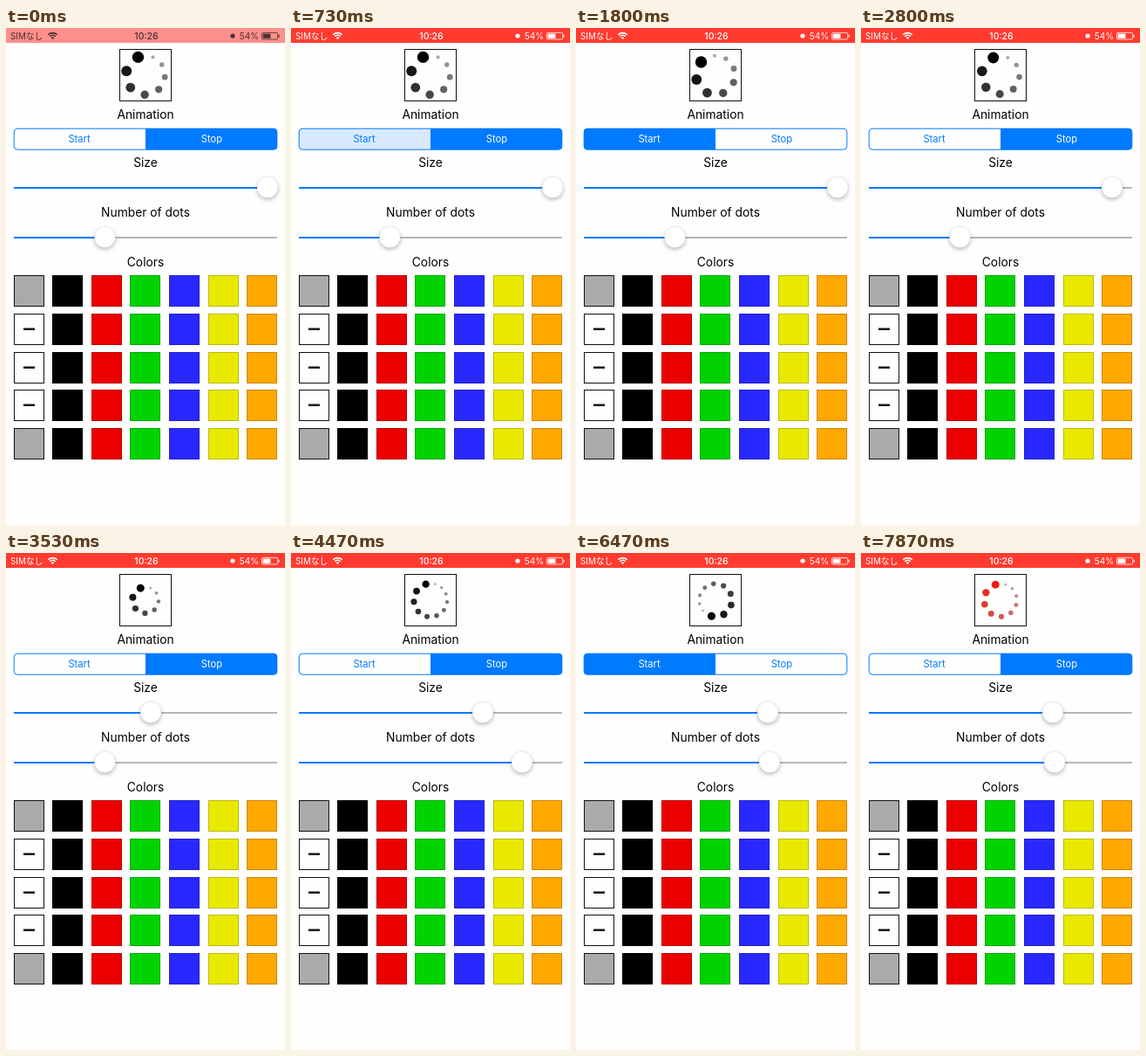
Animation, 320 px wide and 569 px high, one loop 8 s. Source, as an HTML page with a canvas:

```html
<!DOCTYPE html>
<html lang="ja">
<head>
<meta charset="utf-8">
<title>Spinner settings</title>
<style>
html, body { margin: 0; width: 100%; height: 100%; overflow: hidden; background: #fefeff; }
canvas { display: block; width: 320px; height: 569px; }
</style>
</head>
<body>
<canvas id="stage"></canvas>
<script>
const W = 320, H = 569, LOOP = 8000, FPS = 15;
const BLUE = '#007aff', PAPER = '#fefeff', GRAY = [170, 170, 170];
const FONT = 'Inter, "Noto Sans CJK JP", "Noto Sans CJK", sans-serif';
const SWATCHES = ['#aaaaaa', '#000000', '#eb0000', '#00d300', '#2929ff', '#e9e900', '#ffa800'];

// Slider thumb paths: [ms, x]
const SIZE_PATH = [[2733, 300], [2800, 288], [3330, 130], [3800, 220]];
const COUNT_PATH = [[4000, 113.4], [4070, 118], [4467, 265], [4670, 300], [4850, 290], [5133, 174], [5270, 150], [5600, 222]];
// Each run: start button down, spinning, stop button down, stopped
const RUNS = [[730, 835, 1865, 1995], [6065, 6172, 6865, 6995]];
const RED_AT = 7795;

const canvas = document.getElementById('stage');
const ctx = canvas.getContext('2d');
const ratio = window.devicePixelRatio || 1;
canvas.width = W * ratio;
canvas.height = H * ratio;

const clamp = v => Math.max(0, Math.min(1, v));
const mix = (a, b, p) => `rgb(${a.map((v, i) => Math.round(v + (b[i] - v) * p))})`;

// Hermite curve through the points, flat at the ends and turning points
function follow(path, t) {
  const last = path.length - 1;
  if (t <= path[0][0]) return path[0][1];
  if (t >= path[last][0]) return path[last][1];
  const rate = i => (path[i + 1][1] - path[i][1]) / (path[i + 1][0] - path[i][0]);
  const slope = i => {
    if (i === 0 || i === last) return 0;
    const a = rate(i - 1), b = rate(i);
    return a * b <= 0 ? 0 : 2 * a * b / (a + b);
  };
  const i = path.findIndex(p => p[0] > t) - 1;
  const [t0, x0] = path[i], [t1, x1] = path[i + 1];
  const d = t1 - t0, u = (t - t0) / d, s = u * u * (3 - 2 * u);
  return x0 + (x1 - x0) * s + d * u * (1 - u) * (slope(i) * (1 - u) - slope(i + 1) * u);
}

function text(str, x, y, size, color, align = 'center', weight = 400) {
  ctx.font = `${weight} ${size}px ${FONT}`;
  ctx.textAlign = align;
  ctx.fillStyle = color;
  ctx.fillText(str, x, y);
}

function disc(x, y, r, color) {
  ctx.fillStyle = color;
  ctx.beginPath();
  ctx.arc(x, y, r, 0, Math.PI * 2);
  ctx.fill();
}

function rect(x, y, w, h, color) {
  ctx.fillStyle = color;
  ctx.fillRect(x, y, w, h);
}

function frame(x, y, w, h, color) {
  ctx.strokeStyle = color;
  ctx.lineWidth = 1;
  ctx.strokeRect(x + 0.5, y + 0.5, w - 1, h - 1);
}

function statusBar(t) {
  const p = clamp(t / 333);
  const ink = mix([72, 48, 48], [255, 255, 255], p);
  rect(0, 0, W, 17, mix([255, 143, 139], [255, 59, 48], p));
  text('SIMなし', 5, 12.6, 9.8, ink, 'left');
  text('10:26', 161, 12.7, 10.5, ink, 'center', 500);
  text('54%', 290, 12.7, 10, ink, 'right');
  disc(260, 9, 2.6, ink);

  // Wi-Fi fan
  ctx.strokeStyle = ink;
  ctx.lineWidth = 1.6;
  for (const r of [4.6, 7.4]) {
    ctx.beginPath();
    ctx.arc(53.5, 13, r, -Math.PI * 0.75, -Math.PI * 0.25);
    ctx.stroke();
  }
  ctx.fillStyle = ink;
  ctx.beginPath();
  ctx.moveTo(53.5, 13);
  ctx.arc(53.5, 13, 2.6, -Math.PI * 0.75, -Math.PI * 0.25);
  ctx.fill();

  // Battery
  ctx.lineWidth = 0.8;
  ctx.beginPath();
  ctx.roundRect(293.4, 5.4, 18.2, 7.6, 1.4);
  ctx.stroke();
  rect(294.6, 6.6, 8.8, 5.2, ink);
  rect(312.4, 7.8, 1.2, 2.8, ink);
}

function spinner(size, count, turn, ink) {
  const R = size / 2 - 1, least = 0.31;
  const big = Math.PI * R / (count * (1 + least) + Math.PI);
  const ring = R - big;
  const radius = i => big * (least + (1 - least) * i / (count - 1));
  // The dots cover half the ring; the gaps between them are equal
  const gap = Math.PI * ring / count;
  let angle = -Math.PI / 2 + Math.PI / count + turn;
  for (let i = 0; i < count; i++) {
    disc(160 + ring * Math.cos(angle), 54 + ring * Math.sin(angle), radius(i),
      mix(GRAY, ink, i / (count - 1)));
    angle += (radius(i) + radius(i + 1) + gap) / ring;
  }
}

function segments(on, pressed) {
  const edge = 160;
  ctx.save();
  ctx.beginPath();
  ctx.roundRect(9, 115, 302, 24.5, 4);
  ctx.clip();
  rect(on ? 9 : edge, 115, 151, 24.5, BLUE);
  if (pressed) rect(on ? edge : 9, 115, 151, 24.5, 'rgba(0,122,255,0.15)');
  ctx.restore();
  ctx.strokeStyle = BLUE;
  ctx.lineWidth = 1;
  ctx.beginPath();
  ctx.roundRect(9.2, 115.2, 301.6, 24, 4);
  ctx.stroke();
  text('Start', 84, 131.2, 11.2, on ? PAPER : BLUE);
  text('Stop', 236, 131.2, 11.2, on ? BLUE : PAPER);
}

function slider(x, y) {
  rect(9, y - 1, 302, 2, '#b7b7b9');
  rect(9, y - 1, x - 9, 2, BLUE);
  ctx.save();
  ctx.shadowColor = 'rgba(0,0,0,0.28)';
  ctx.shadowBlur = 5 * ratio;
  ctx.shadowOffsetY = 2 * ratio;
  disc(x, y - 0.5, 12, '#ffffff');
  ctx.restore();
  ctx.strokeStyle = 'rgba(0,0,0,0.1)';
  ctx.lineWidth = 0.5;
  ctx.stroke();
}

function swatches() {
  for (let row = 0; row < 5; row++) {
    const y = Math.round(283 + row * 43.8);
    SWATCHES.forEach((color, col) => {
      const x = Math.round(8.6 + col * 44.6);
      const none = col === 0 && row > 0 && row < 4;
      rect(x, y, 35, 36, none ? PAPER : color);
      frame(x, y, 35, 36, col === 0 ? '#111' : 'rgba(0,0,0,0.2)');
      if (none) rect(x + 11, y + 16.5, 13, 2.4, '#111');
    });
  }
}

function draw(t) {
  const run = RUNS.find(r => t >= r[0] && t < r[3]);
  const on = !!run && t >= run[1];
  const pressed = !!run && (t < run[1] || t >= run[2]);
  const turn = on ? (t - run[1]) / 500 * Math.PI * 2 : 0;
  const sizeX = follow(SIZE_PATH, t), countX = follow(COUNT_PATH, t);
  const size = 20 + (sizeX - 20) / 7;
  const count = Math.floor(6 + (countX - 20) * 6 / 280);

  ctx.setTransform(ratio, 0, 0, ratio, 0, 0);
  rect(0, 0, W, H, PAPER);
  statusBar(t);
  frame(130, 24, 60, 60, '#111');
  spinner(size, count, turn, t >= RED_AT ? [236, 30, 18] : [0, 0, 0]);
  text('Animation', 160, 104, 13.8, '#000');
  segments(on, pressed);
  text('Size', 160, 159, 13.8, '#000');
  slider(sizeX, 183);
  text('Number of dots', 160, 216, 13.8, '#000');
  slider(countX, 240);
  text('Colors', 160, 272.7, 13.8, '#000');
  swatches();
}

function tick() {
  const t = performance.now() % LOOP;
  draw(Math.floor(t * FPS / 1000 + 0.1) * 1000 / FPS % LOOP);
  requestAnimationFrame(tick);
}
tick();
</script>
</body>
</html>
```
